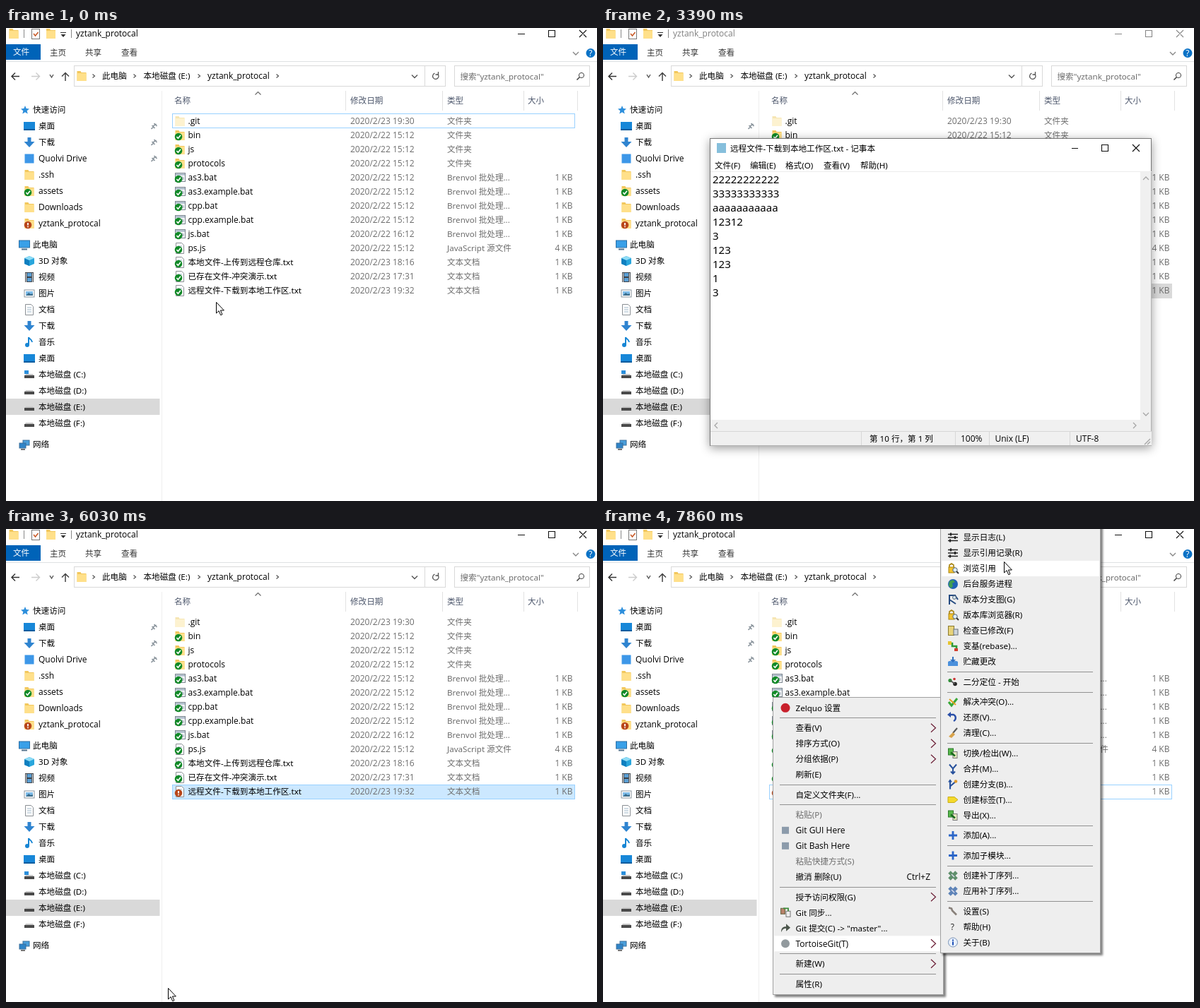
Recreate the animation shown at these times as an HTML page. Size 836 by 670 pixels, loop 8000 ms.

```html
<!DOCTYPE html>
<html lang="zh-CN">
<head>
<meta charset="utf-8">
<title>文件夹</title>
<style>
html, body { margin: 0; width: 100%; height: 100%; overflow: hidden; background: #fff; }
svg { display: block; width: 836px; height: 670px; }
text { font: 12px 'Open Sans', sans-serif; white-space: pre; }
.zh { font: 11.6px 'Noto Sans', 'Noto Sans CJK SC', 'Noto Sans CJK', sans-serif; }
#doc text { font: 15px 'Noto Sans', sans-serif; }
#pad { transform-origin: 464px 374px; filter: drop-shadow(0 3px 7px rgba(0, 0, 0, .4)); }
.menu { filter: drop-shadow(3px 3px 1.5px rgba(0, 0, 0, .5)); }
</style>
</head>
<body>
<svg id="stage" viewBox="0 0 836 670"></svg>
<script>
const $ = id => document.getElementById(id);
const set = (id, attrs) => { for (const k in attrs) $(id).setAttribute(k, attrs[k]); };
const show = (id, on) => set(id, { visibility: on ? 'visible' : 'hidden' });

// Shape helpers; y of text is its middle
const T = (x, y, s, fill = '#000', more = '') =>
  `<text x="${x}" y="${y + 4.2}" fill="${fill}" ${/[一-龥]/.test(s) ? 'class="zh"' : ''} ${more}>${s}</text>`;
const P = (d, fill = 'none', stroke = 'none', w = 1) => `<path d="${d}" fill="${fill}" stroke="${stroke}" stroke-width="${w}"/>`;
const R = (x, y, w, h, fill, stroke = 'none', id = '') =>
  `<rect ${id && `id="${id}"`} x="${x}" y="${y}" width="${w}" height="${h}" fill="${fill}" stroke="${stroke}"/>`;
const C = (x, y, r, fill, stroke = 'none') => `<circle cx="${x}" cy="${y}" r="${r}" fill="${fill}" stroke="${stroke}"/>`;
const at = (x, y, s) => `<g transform="translate(${x},${y})">${s}</g>`;
const G = (id, s, more = '') => `<g id="${id}" ${more}>${s}</g>`;

// Icons, centred on 0,0
const folderOf = (back, front) => P('M-6.5-7h5l1 2h7v12h-13z', back) + P('M-6.5-4h13v11h-13z', front);
const folder = folderOf('#f2c75c', '#ffe08a'), pale = folderOf('#f6e6b4', '#fdf2d0');
const okBadge = C(-2, 2, 5.3, '#128a28') + P('M-4.6 2l2 2.2 3.6-4.4', 'none', '#fff', 1.6);
const editBadge = C(-2, 2, 5.3, '#b8471b') + P('M-2-1v3.6M-2 3.7v1.6', 'none', '#fff', 1.8);
const sheet = P('M-5.5-7.5h8l3 3v12h-11z', '#fff', '#8a8f94') + P('M-3-3h6M-3 0h6M-3 3h6', 'none', '#9fb8c8');
const batch = R(-6.5, -6.5, 14, 12, '#f4f6f8', '#7c8690') + P('M-6-4.5h13', 'none', '#9fb0c0', 2) + C(3, 1, 2.5, '#a9b4be');
const desktop = R(-8, -6, 16, 12, '#1787d8') + R(-8, 4, 16, 2, '#0c5c9e');
const down = P('M-2.5-7h5v6h5l-7.5 8-7.5-8h5z', '#2f84d0');
const drive = P('M-5-1h10l2 3h-14z', '#c9c9c9') + R(-7, 1, 14, 4, '#4a4a4a');
const star = P('M0-6l1.7 4 4.3.4-3.3 2.8 1 4.4L0 3.2l-3.7 2.4 1-4.4L-6-1.6l4.3-.4z', '#2d8fdc');
const screen = R(-7.5, -6, 15, 10, '#39a0e8', '#2a6ea5') + P('M-4 6.5h8', 'none', '#55738c', 2);
const cube = P('M-7-4l7-3 7 3v8l-7 3-7-3z', '#29a6dc') + P('M-7-4l7 3v8l-7-3z', '#0f7fc0') + P('M-7-4l7-3 7 3-7 3z', '#8fdcf5');
const film = R(-6, -7, 12, 14, '#3b4148') + R(-3, -6, 6, 5, '#5a9fd4') + R(-3, 1, 6, 5, '#5a9fd4') +
  P('M-4.5-6v13M4.5-6v13', 'none', '#ddd', 1.2);
const picture = R(-7, -5, 14, 10, '#fff', '#8a949c') + R(-5, -3, 10, 6, '#7dbbe8') + P('M-5 3l4-4 3 2 3-1v3z', '#3d6f8e');
const note = P('M-1 4V-7c1 3 5 3 5 7', 'none', '#1886d4', 2) + C(-3, 4, 3, '#1886d4');
const network = R(-2, -6, 9, 7, '#4a9fdc', '#3a6f9a') + R(-7, -2, 9, 7, '#2f84c8', '#3a6f9a') + P('M-5 7h6', 'none', '#777', 2);
const pin = P('M-4 4l3-3M-3-1l4 4M-1 0l3-3M0-4l4 4M2-3l1 1', 'none', '#8b959d', 1.7);
const chevron = P('M-1.5-2.5l3 2.5-3 2.5', 'none', '#555', 1.2);
const dropMark = (w, c = '#555') => P(`M${-w}-2l${w} 4 ${w}-4`, 'none', c, 1.4);

// Explorer
const nav = [
  [116, 27, star, '快速访问'], [139, 33, desktop, '桌面'], [162, 33, down, '下载'],
  [185, 33, R(-6.5, -6.5, 13, 13, '#3d97e8'), 'Quolvi Drive'], [208, 33, folder, '.ssh'],
  [231, 33, folder + okBadge, 'assets'], [254, 33, folder, 'Downloads'], [277, 33, folder + editBadge, 'yztank_protocal'],
  [307, 26, screen, '此电脑'], [330, 33, cube, '3D 对象'], [353, 33, film, '视频'], [376, 33, picture, '图片'],
  [399, 33, sheet, '文档'], [422, 33, down, '下载'], [445, 33, note, '音乐'], [468, 33, desktop, '桌面'],
  [491, 33, drive + R(-7, -6, 6, 5, '#2b8fdc'), '本地磁盘 (C:)'], [514, 33, drive, '本地磁盘 (D:)'],
  [537, 33, drive, '本地磁盘 (E:)'], [560, 33, drive, '本地磁盘 (F:)'], [590, 26, network, '网络']
];
const dir = '文件夹', bat = 'Brenvol 批处理...', txt = '文本文档', day = '22 15:12';
const files = [
  ['.git', '23 19:30', dir], ['bin', day, dir], ['js', day, dir], ['protocols', day, dir],
  ['as3.bat', day, bat, 1], ['as3.example.bat', day, bat, 1], ['cpp.bat', day, bat, 1],
  ['cpp.example.bat', day, bat, 1], ['js.bat', '22 16:12', bat, 1], ['ps.js', day, 'JavaScript 源文件', 4],
  ['本地文件-上传到远程仓库.txt', '23 18:16', txt, 1], ['已存在文件-冲突演示.txt', '23 17:31', txt, 1],
  ['远程文件-下载到本地工作区.txt', '23 19:32', txt, 1]
];
const grey = '#6d6d6d';
const fileRow = ([name, date, type, kb], i) => {
  const y = 132 + 20 * i;
  const icon = !i ? pale : type === dir ? folder : type === bat ? batch : sheet;
  const badge = i === 12 ? G('okMark', okBadge) + G('editMark', editBadge) : i ? okBadge : '';
  return at(246, y, icon + badge) +
    T(257.5, y, name) + T(487, y, '2020/2/' + date, grey) + T(624, y, type, grey) +
    (kb ? T(801.5, y, kb + ' KB', grey, 'text-anchor="end"') : '');
};
const explorer =
  at(11, 8, folder) + P('M25.5 2v12M92.5 2v12', 'none', '#888') +
  R(36.5, 1.5, 11, 14, '#fff', '#777') + P('M39 8l2.5 3 4-5', 'none', '#c85a28', 1.6) + at(63.5, 8, folder) +
  P('M77 6.5h8', 'none', '#333') + P('M77.5 9h7l-3.5 4z', '#333') +
  G('caption', T(99, 8, 'yztank_protocal') + P('M724 8.5h10M767.5 3.5h9v9h-9zM811 3l10 10M821 3l-10 10', 'none', '#111', 1.1)) +
  R(0, 23, 49, 22, '#0063b8') + T(10, 34, '文件', '#fff') +
  T(62, 35, '主页', '#333') + T(112, 35, '共享', '#333') + T(163, 35, '查看', '#333') +
  P('M0 47.5h836', 'none', '#dfe1e3') + at(806, 36, dropMark(4, '#888')) +
  C(827, 35.5, 6.5, '#0a72c6') + T(824.3, 35.5, '?', '#fff', 'font-weight="700"') +
  P('M19 68.5H8.5M13 63.5l-5 5 5 5', 'none', '#333', 1.4) + P('M36 68.5h11M42.5 63.5l5 5-5 5', 'none', '#ccc', 1.4) +
  at(64.5, 68, dropMark(2.5, '#555')) + P('M84 75V63.5M79 68.5l5-5 5 5', 'none', '#444', 1.5) +
  R(96.5, 53.5, 525, 29, '#fff', '#d9d9d9') + P('M592.5 54v28', 'none', '#d9d9d9') + at(107, 68, folder) +
  [124, 182, 273, 384].map(x => at(x, 68, chevron)).join('') +
  T(136, 68, '此电脑') + T(194.5, 68, '本地磁盘 (E:)') + T(285, 68, 'yztank_protocal') +
  at(578, 68.5, dropMark(4)) + P('M610.5 65a4.2 4.2 0 1 1-4-.8M611.5 62v4h-4', 'none', '#555', 1.3) +
  R(634.5, 53.5, 191, 29, '#fff', '#d9d9d9') + T(642.5, 68.5, '搜索"yztank_protocal"', grey) +
  C(814, 67, 3.6, 'none', '#444') + P('M811.5 69.5l-4 4', 'none', '#444', 1.6) +
  P('M220.5 89v581', 'none', '#efefef') + P('M480.5 89v28M617.5 89v28M732.5 89v28M808.5 89v28', 'none', '#e2e2e2') +
  P('M352.5 94.5l4-4 4 4', 'none', '#666', 1.1) +
  [[238, '名称'], [487, '修改日期'], [624, '类型'], [738, '大小']].map(([x, s]) => T(x, 103, s, '#4c566b')).join('') +
  R(0, 525, 217.5, 23, '#d9d9d9') +
  nav.map(([y, x, icon, s]) => at(x, y, icon) + T(x < 30 ? 38 : 46, y, s)).join('') +
  [139, 162, 185].map(y => at(209.5, y, pin)).join('') +
  R(235, 122, 570, 20, '#e5f3ff', 'none', 'hover') + R(235.5, 121.5, 569, 20, 'none', '#99d1ff', 'focus') +
  R(235.5, 362.5, 569, 20, 'none', 'none', 'picked') +
  files.map(fileRow).join('');

// Notepad
const pad = R(151.5, 156.5, 624, 435, '#fff', '#777') + R(161, 163, 13, 14, '#86bfdc') + G('name', '') +
  R(731, 157, 44, 28, '#e81123', 'none', 'closeBack') + P('M663 170.5h9M705.5 165.5h9v9h-9z', 'none', '#111', 1.1) +
  G('cross', '<path d="M749 165l10 10M759 165l-10 10" stroke-width="1.2"/>') +
  [[158, '文件(F)'], [208, '编辑(E)'], [258, '格式(O)'], [312, '查看(V)'], [364, '帮助(H)']].map(([x, s]) => T(x, 194.5, s)).join('') +
  P('M152 203.5h624', 'none', '#ececec') + R(760, 204, 15.5, 367, '#f0f0f0') + R(152, 555, 610, 16, '#f0f0f0') +
  P('M764 215l4-4 4 4M764 545l4 4 4-4M162 559l-4 4 4 4M750 559l4 4-4 4', 'none', '#a6a6a6', 1.3) +
  R(152, 571, 624, 20.5, '#f0f0f0') + P('M152 571.5h624M365.5 572v19M498.5 572v19M546.5 572v19M660.5 572v19', 'none', '#d7d7d7') +
  P('M766 590l8-8M770 590l4-4', 'none', '#aaa', 1.5) +
  G('status', '') + T(506, 582, '100%') + T(554.5, 582, 'Unix (LF)') + T(669, 582, 'UTF-8') +
  G('doc', '') + R(155, 206, 1.2, 19, '#000', 'none', 'caret');

// Menu icons
const bars = P('M-7-4.5h14M-7 0h14M-7 4.5h14', 'none', '#222', 1.6) + P('M-3-6.5v4M3-2v4M-4 2.5v4', 'none', '#222', 2.2);
const finder = P('M-5-2V-5l3-2 3 2v3', 'none', '#a98512', 1.6) + R(-6, -2, 8, 8, '#f2c230', '#a98512') +
  C(3, 2, 3.2, '#dcecf8', '#567') + P('M5 4l3 3', 'none', '#333', 2);
const globe = C(0, 0, 7, '#1f63b5') + P('M-5-4l5-2 3 3-4 2 1 4-3 3-3-4z', '#3f9d52');
const graph = P('M-5 7V-6h9M-5 0l9 6M3-6l4 6', 'none', '#244a80', 2) + C(2, -3, 2.4, '#dcecf8', '#567');
const check = R(-6.5, -6.5, 8, 13, '#e8d37a', '#8a7a30') + R(1, -2, 6, 8, '#cdd5dc', '#68727a');
const arrows = P('M-6-4h5v4h6v5', 'none', '#2f9a3a', 2.6) + R(-7, -7, 5, 5, '#e8c52e') + R(2, 3, 5, 4, '#d23b2c');
const tray = P('M-7 0l2-1h10l2 1v6h-14z', '#4a90dc') + P('M-1-7h2v4h3l-4 4-4-4h3z', '#2f6fc0');
const bisect = C(-4, -2, 2.6, '#2c8f34') + C(3, 3, 2.8, '#222') + P('M-4-2l7 5', 'none', '#555', 1.6) + C(2, -4, 1.8, '#c33');
const resolve = P('M-6 0l4 5L6-5', 'none', '#38a838', 3) + P('M-5-4l9 8', 'none', '#e0a020', 2);
const undo = P('M-5-4h6a5 5 0 0 1 0 9', 'none', '#2a4fa8', 2.4) + P('M-8-4l5-4v8z', '#2a4fa8');
const broom = P('M6-7L0 0', 'none', '#555', 2) + P('M0-1l3 3-5 5-4-2z', '#d8a24a');
const swap = R(-6.5, -6.5, 7, 9, '#58b84c', '#2c7a2a') + R(0, -2, 6, 9, '#e6e9c0', '#777') + P('M-3-1l6 5', 'none', '#196a1d', 2.4);
const merge = P('M-5-6l5 6 5-6M0 0v7M-3 4l3 3 3-3', 'none', '#27519c', 2);
const branch = P('M-4 7V-6M-4 3l7-6', 'none', '#27519c', 2.2) + C(4, -4, 2.3, '#e09a2c') + P('M-7-3l3-4 3 4z', '#27519c');
const tag = P('M-7-4h9l5 4-5 4h-9z', '#f4d92b', '#c8ad1a');
const plus = P('M0-6v12M-6 0h12', 'none', '#2b66c8', 2.8);
const patch = c => P('M-5-5L5 5M5-5L-5 5', 'none', c, 5) + P('M-2-2l4 4', 'none', '#dde', 1.4);
const wrench = P('M-6-5l4 1 1 3 6 6', 'none', '#88807a', 2.6);
const quest = T(-3.2, 0, '?', '#222', 'font-weight="700"');
const info = C(0, 0, 6.5, '#e9f1fb', '#7a93b8') + P('M0-1v5M0-4v2', 'none', '#1f50b8', 2);
const sync = R(-6.5, -6, 6, 8, '#b8826a', '#664') + R(1, -2, 6, 8, '#eee', '#777') + P('M-3-6h7v4', 'none', '#3a8c3a', 1.8);
const commit = P('M-6 6c0-7 3-8 7-8v-4l6 5.5-6 5v-4c-3 0-5 1-7 5.5z', '#4c564c');
const gitBox = R(-5, -5, 10, 10, '#8c9bab');

// '~' marks a disabled entry, a final '>' a submenu
const mainItems = [
  ['Zelquo 设置', C(0, 0, 6.5, '#c8202c')], '-', ['查看(V)>'], ['排序方式(O)>'], ['分组依据(P)>'], ['刷新(E)'], '-',
  ['自定义文件夹(F)...'], '-', ['~粘贴(P)'], ['Git GUI Here', gitBox], ['Git Bash Here', gitBox], ['~粘贴快捷方式(S)'],
  ['撤消 删除(U)', '', 'Ctrl+Z'], '-', ['授予访问权限(G)>'], ['Git 同步...', sync], ['Git 提交(C) -> "master"...', commit],
  ['TortoiseGit(T)>', C(0, 0, 6, '#929a9e')], '-', ['新建(W)>'], '-', ['属性(R)']
];
const subItems = [
  ['显示日志(L)', bars], ['显示引用记录(R)', bars], ['浏览引用', finder], ['后台服务进程', globe], ['版本分支图(G)', graph],
  ['版本库浏览器(R)', finder], ['检查已修改(F)', check], ['变基(rebase)...', arrows], ['贮藏更改', tray], '-',
  ['二分定位 - 开始', bisect], '-', ['解决冲突(O)...', resolve], ['还原(V)...', undo], ['清理(C)...', broom], '-',
  ['切换/检出(W)...', swap], ['合并(M)...', merge], ['创建分支(B)...', branch], ['创建标签(T)...', tag], ['导出(X)...', swap], '-',
  ['添加(A)...', plus], '-', ['添加子模块...', plus], '-', ['创建补丁序列...', patch('#5f8f6c')], ['应用补丁序列...', patch('#5f84b8')], '-',
  ['设置(S)', wrench], ['帮助(H)', quest], ['关于(B)', info]
];
function menu(id, x, top, w, h, y, items) {
  const ys = [];
  let s = '';
  for (const item of items) {
    if (item === '-') {
      s += P(`M${x + 10} ${Math.round(y - 8) + .5}H${x + w - 11}`, 'none', '#919191');
      y += 6.5;
      continue;
    }
    const [label, icon = '', shortcut] = item;
    s += at(x + 18, y, icon) + T(x + 32.5, y, label.replace(/^~|>$/g, ''), label[0] === '~' ? grey : '#000');
    if (label.endsWith('>')) s += P(`M${x + 224} ${y - 6}l6.5 6-6.5 6`, 'none', '#6a1c34', 1.2);
    if (shortcut) s += T(x + 223, y, shortcut, '#000', 'text-anchor="end"');
    ys.push(y);
    y += 22;
  }
  const html = G(id, R(x + .5, top + .5, w - 1, h - 1, '#eee', '#a0a0a0') +
    R(x + 2, 0, w - 4, 22, '#fff', 'none', id + 'Lit') + s, 'class="menu"');
  return { html, ys };
}
const main = menu('main', 240, 238, 242, 422, 253.3, mainItems);
const sub = menu('sub', 477, -40, 227, 641, 12, subItems);

$('stage').innerHTML = explorer + G('pad', pad) + main.html + sub.html +
  G('pointer', G('arrow', P('M.5.5V16l3.6-3.3 2.6 6 2.3-1-2.6-5.7h5z', '#fff', '#000')) +
    G('beam', P('M-3.5-8h2.5l1 1 1-1h2.5M-3.5 8h2.5l1-1 1 1h2.5M0-7V7', 'none', '#000', 1.3)) +
    G('resize', P('M-10 0l5-4.5v3h10v-3l5 4.5-5 4.5v-3h-10v3z', '#fff', '#000')));

// Pointer stops: time, x, y
const path = [
  [0, 297, 388], [70, 297, 388], [230, 300, 379], [3860, 300, 379], [4000, 420, 330], [4240, 690, 210], [4320, 792, 168],
  [4390, 785, 173], [4470, 779, 173], [4540, 779, 173], [4620, 755, 170], [4780, 755, 170], [5010, 407, 384], [5070, 407, 384],
  [5300, 300, 560], [5540, 240, 657], [5960, 240, 658], [6030, 229, 650], [6110, 229, 650], [6180, 239, 660], [6570, 239, 660],
  [6640, 263, 649], [6710, 263, 649], [6850, 290, 590], [7410, 461, 590], [7480, 510, 520], [7560, 560, 320], [7640, 574, 125],
  [7710, 566, 47], [7800, 566, 47], [7860, 567, 46]
];
function pointerAt(t) {
  const i = path.findIndex(k => k[0] > t);
  if (i < 0) return path[path.length - 1].slice(1);
  const [t0, x0, y0] = path[i - 1], [t1, x1, y1] = path[i], u = (t - t0) / (t1 - t0);
  return [x0 + (x1 - x0) * u, y0 + (y1 - y0) * u];
}

const start = '22222222222\n33333333333\naaaaaaaaaaa';
const keys = [
  [1600, '\n'], [1830, '123'], [2000, '12'], [2080, '\n3'], [2150, '\n1'], [2230, '23'], [2310, '\n1'],
  [2390, '23'], [2460, '\n'], [2690, '1'], [2770, '\n3'], [2840, '\n']
];
let shown = '';
function drawPad(t, x, y) {
  const typed = keys.filter(k => k[0] <= t);
  const lines = (start + typed.map(k => k[1]).join('')).split('\n');
  const row = t < 1220 ? 0 : lines.length - 1, col = t < 1220 ? 0 : lines[row].length;
  const title = t < 960 ? '无标题' : (typed.length && t < 3390 ? '*' : '') + '远程文件-下载到本地工作区.txt';
  const key = title + row + '/' + col;
  if (key !== shown) {
    shown = key;
    $('doc').innerHTML = lines.map((s, i) => T(155, 216 + 20 * i, s)).join('');
    $('name').innerHTML = T(180, 170.5, title + ' - 记事本');
    $('status').innerHTML = T(377, 582, `第 ${row + 1} 行，第 ${col + 1} 列`);
  }
  const last = typed.length ? typed[typed.length - 1][0] : t < 1220 ? 850 : 1220;
  set('caret', { x: 155 + col * 8.55, y: 205 + 20 * row, opacity: Math.floor((t - last) / 530) % 2 ? 0 : 1 });

  const red = t < 4850 && x > 731 && x < 775 && y > 157 && y < 185;
  set('closeBack', { opacity: red ? 1 : 0 });
  set('cross', { stroke: red ? '#fff' : '#111' });
  const u = Math.min(1, Math.max(0, t < 4780 ? (t - 700) / 290 : 1 - (t - 4780) / 210));
  const p = 1 - (1 - u) ** 2;
  $('pad').style.transform = `scale(${.9 + .1 * p})`;
  $('pad').style.opacity = p * p;
}

function light(id, ys, i) {
  set(id, { y: i < 0 ? 0 : ys[i] - 11, opacity: i < 0 ? 0 : 1 });
}
const itemAt = (ys, y) => ys.findIndex(c => Math.abs(c - y) <= 11);

function draw(now) {
  const t = now % 8000, [x, y] = pointerAt(t);
  const busy = t >= 700 && t < 4780;

  set('caption', { opacity: busy ? .5 : 1 });
  const i = Math.floor((y - 122) / 20);
  const over = !busy && t < 6330 && x > 235 && x < 805 && i >= 0 && i < 13;
  set('hover', { y: 122 + 20 * i, opacity: over ? 1 : 0 });
  set('focus', { opacity: t < 460 ? 1 : 0 });
  set('picked', {
    fill: t < 460 ? 'none' : busy ? '#d9d9d9' : t < 6180 ? '#cce8ff' : '#fff',
    stroke: t < 460 ? 'none' : busy ? '#d9d9d9' : '#99d1ff'
  });
  show('okMark', t < 3470);
  show('editMark', t >= 3470);
  drawPad(t, x, y);

  const subOpen = t >= 7100;
  set('main', { opacity: t < 6330 ? 0 : Math.min(1, .5 + (t - 6330) / 150) });
  show('sub', subOpen);
  light('mainLit', main.ys, subOpen ? 14 : x > 242 && x < 480 ? itemAt(main.ys, y) : -1);
  light('subLit', sub.ys, subOpen && x > 479 ? itemAt(sub.ys, y) : -1);

  const inText = t > 800 && t < 4780 && x > 152 && x < 760 && y > 204 && y < 555;
  const onEdge = t > 4000 && t < 4780 && x > 775 && x < 787;
  set('pointer', { transform: `translate(${Math.round(x)},${Math.round(y)})`, opacity: t >= 1600 && t < 3700 ? 0 : 1 });
  show('beam', inText);
  show('resize', onEdge);
  show('arrow', !inText && !onEdge);
  requestAnimationFrame(draw);
}
requestAnimationFrame(draw);
</script>
</body>
</html>
```
